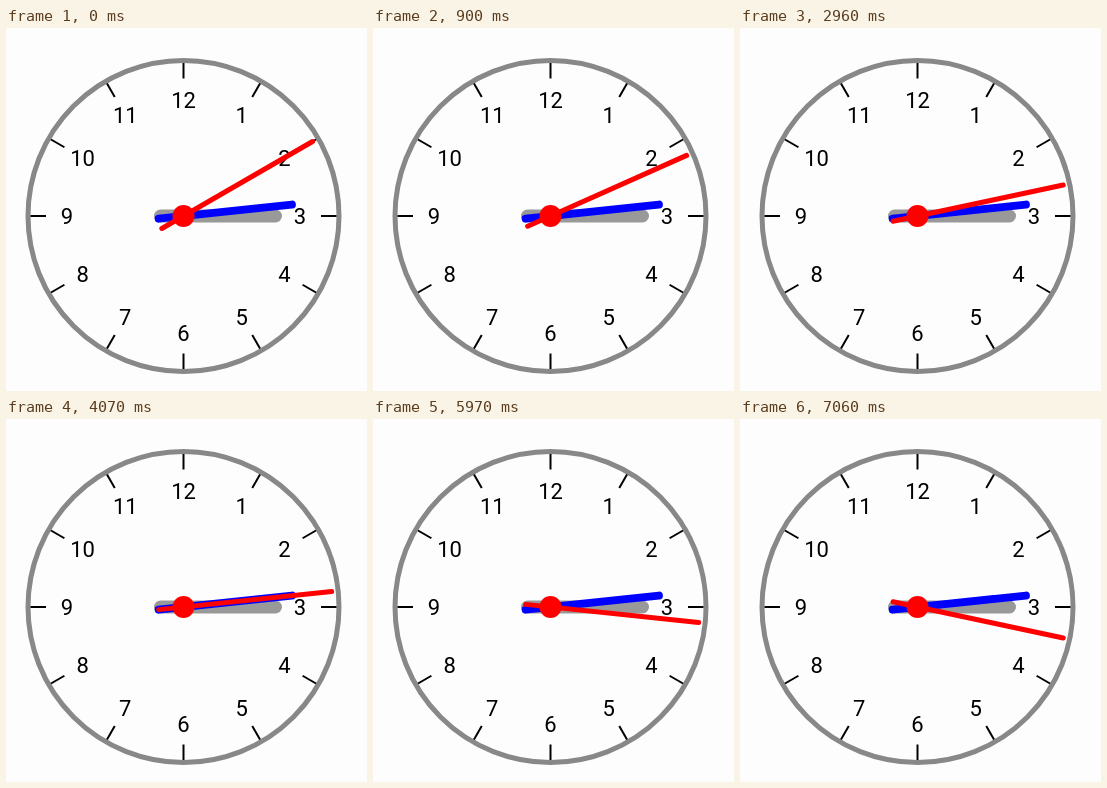
Write an HTML page that moves like this. It is 361x363 px and loops after 8000 ms.

```html
<!DOCTYPE html>
<html lang="en">
<head>
<meta charset="utf-8">
<title>Clock</title>
<style>
  html, body { margin: 0; width: 100%; height: 100%; overflow: hidden; background: #fdfdfd; }
  svg { display: block; width: 361px; height: 363px; }
  text { font: 22px Roboto, sans-serif; text-anchor: middle; fill: #000; }
  .hand { stroke-linecap: round; }
</style>
</head>
<body>
<svg viewBox="0 0 361 363">
  <g transform="translate(177.5 188)">
    <circle r="155.5" fill="none" stroke="#888" stroke-width="5"/>
    <g id="dial"></g>
    <line class="hand" x1="-23" x2="92" stroke="#999" stroke-width="13"/>
    <line class="hand" x1="-25" x2="109" stroke="#00f" stroke-width="8" transform="rotate(-6)"/>
    <line class="hand" id="second" x1="-25" x2="149" stroke="#f00" stroke-width="5"/>
    <circle r="11" fill="#f00"/>
  </g>
</svg>
<script>
  const LOOP = 8000;
  const FIRST_SECOND = 10;
  const TICKS = [0, 900, 2020, 2960, 4070, 5100, 5970, 7060];
  const dial = document.getElementById('dial');
  const second = document.getElementById('second');

  function add(tag, attrs, text = '') {
    const el = document.createElementNS('http://www.w3.org/2000/svg', tag);
    for (const key in attrs) el.setAttribute(key, attrs[key]);
    el.textContent = text;
    dial.append(el);
  }

  for (let hour = 1; hour <= 12; hour++) {
    const deg = hour * 30 - 90;
    const a = deg * Math.PI / 180;
    add('line', { x1: 137.5, x2: 153, stroke: '#000', 'stroke-width': 2, transform: `rotate(${deg})` });
    add('text', { x: 116.5 * Math.cos(a), y: 116.5 * Math.sin(a) + 8 }, hour);
  }

  const start = performance.now();
  function draw() {
    const t = (performance.now() - start) % LOOP;
    const step = TICKS.filter(at => at <= t).length - 1;
    second.setAttribute('transform', `rotate(${(FIRST_SECOND + step) * 6 - 90})`);
    requestAnimationFrame(draw);
  }
  draw();
</script>
</body>
</html>
```
